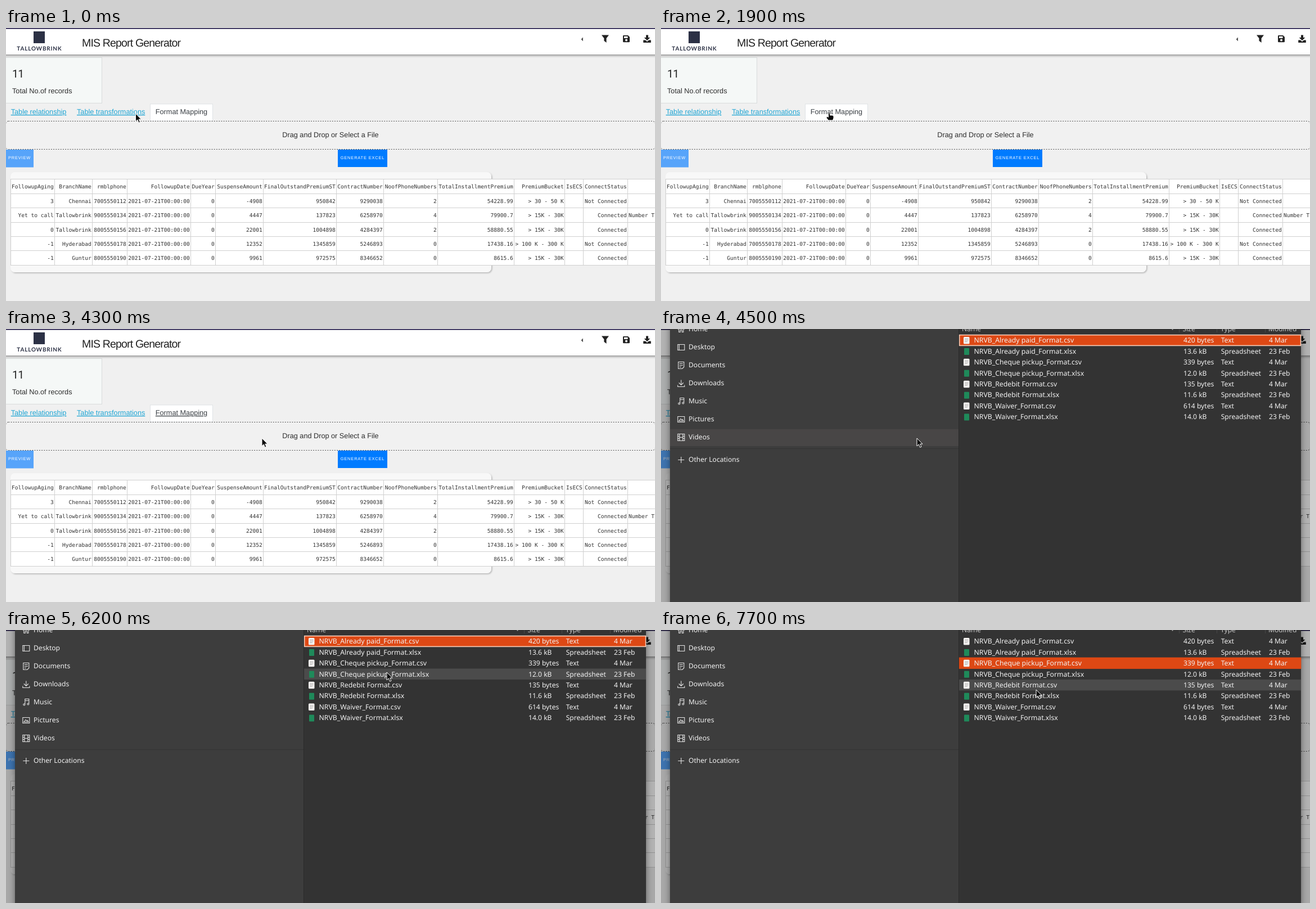
Animation, 1154 px wide and 485 px high, one loop 8000 ms. Source, as an HTML page:

```html
<!DOCTYPE html>
<html lang="en">
<head>
<meta charset="utf-8">
<title>MIS Report Generator</title>
<style>
html, body { margin: 0; width: 100%; height: 100%; overflow: hidden; background: #f0f0f0; }
svg { display: block; width: 1154px; height: 485px; }
text { font: 12.7px "Liberation Sans", Arial, sans-serif; fill: #2d2d2d; text-rendering: geometricPrecision; white-space: pre; }
.title { font-size: 19.5px; letter-spacing: -.83px; fill: #222; }
.count { font: 19.5px Roboto, sans-serif; letter-spacing: -.83px; fill: #222; }
.brand { font: 700 10px Lato, sans-serif; letter-spacing: .8px; fill: #2c3145; }
.button { font-size: 7.5px; letter-spacing: .8px; fill: #fff; }
.cell { font: 9.59px "DejaVu Sans Mono", monospace; fill: #333; }
.dialog text { font: 12.1px "Noto Sans", "Open Sans", sans-serif; fill: #f2f2f2; }
.dialog .head { fill: #c4c4c4; }
.line { fill: none; stroke: #e4e4e4; stroke-width: 1.1; }
.underlined { text-decoration: underline; text-decoration-thickness: 1px; text-underline-offset: 2px; }
</style>
</head>
<body>
<svg id="stage" viewBox="0 0 1154 485"></svg>
<script>
const LOOP = 8000, STEP = 100;
const LINK = '#1ea5d4', LINK_HOVER = '#0fa0ce', INK = '#3a3f44';
const ROW_TOP = 10.3, ROW_PITCH = 19.43;

const rect = (x, y, w, h, fill, more = '') =>
  `<rect x="${x}" y="${y}" width="${w}" height="${h}" fill="${fill}" ${more}/>`;
const text = (x, y, str, more = '') => `<text x="${x}" y="${y}" ${more}>${str.replace(/>/g, '&gt;')}</text>`;
const path = (d, more = '') => `<path d="${d}" ${more}/>`;

function header() {
  return rect(-4, 0, 1162, 47, '#fff', 'filter="url(#barShadow)"') +
    rect(0, 0, 1154, 1.6, '#1d1446') +
    rect(49, 6, 20, 21, '#2c3145') +
    text(59.4, 39.5, 'TALLOWBRINK', 'class="brand" text-anchor="middle"') +
    text(135, 33, 'MIS Report Generator', 'class="title"') +
    path('M1026 16.5V23.5L1022.5 20Z', 'fill="#555"') +
    path('M1059 12.5H1072L1067.6 18.3V26L1063.4 22.8V18.3Z', 'fill="#222"') +
    path('M1098.3 13H1106L1109 16V24Q1109 25.3 1107.7 25.3H1098.3Q1097 25.3 1097 24V14.3Q1097 13 1098.3 13ZM1099 14.8V18H1105.5V14.8ZM1103 19.6a2 2 0 1 0 .01 0Z',
      'fill="#222" fill-rule="evenodd"') +
    path('M1138 12.5H1142V17H1145.3L1140 22.3L1134.7 17H1138Z', 'fill="#222"') +
    path('M1133.2 21.5H1137L1140 24.3L1143 21.5H1146.8V26H1133.2Z', 'fill="#222"');
}

function summary() {
  return rect(-1, 52.5, 171.5, 81, '#f5f8f7', 'stroke="#d9dcdc"') +
    text(11, 87.5, '11', 'class="count"') +
    text(11, 116, 'Total No.of records');
}

function tabs() {
  const tab = (id, x, w) => rect(x, 135, w, 30, '#fff', `id="${id}" stroke="#e0e3e6"`);
  return tab('transformTab', 117, 139.5) + tab('formatTab', 256.5, 111) +
    text(8.7, 153, 'Table relationship', `class="underlined" style="fill:${LINK}"`) +
    text(126, 153, 'Table transformations', 'id="transformLabel"') +
    text(265.8, 153, 'Format Mapping', 'id="formatLabel"');
}

function table() {
  const edges = [8.5, 86.5, 153.5, 215.5, 328.5, 372.5, 457.5, 587.5, 671.5, 767.5, 903.5, 993.5, 1026.5, 1105.5, 1200];
  const date = '2021-07-21T00:00:00';
  const rows = [
    'FollowupAging|BranchName|rmblphone|FollowupDate|DueYear|SuspenseAmount|FinalOutstandPremiumST|ContractNumber|NoofPhoneNumbers|TotalInstallmentPremium|PremiumBucket|IsECS|ConnectStatus',
    `3|Chennai|7005550112|${date}|0|-4908|950842|9290038|2|54228.99|> 30 - 50 K||Not Connected`,
    `Yet to call|Tallowbrink|9005550134|${date}|0|4447|137823|6258970|4|79900.7|> 15K - 30K||Connected`,
    `0|Tallowbrink|8005550156|${date}|0|22001|1004898|4284397|2|58880.55|> 15K - 30K||Connected`,
    `-1|Hyderabad|7005550178|${date}|0|12352|1345859|5246893|0|17438.16|> 100 K - 300 K||Not Connected`,
    `-1|Guntur|8005550190|${date}|0|9961|972575|8346652|0|8615.6|> 15K - 30K||Connected`
  ];
  const lineY = i => Math.round(268.4 + 25.4 * i) + .5;
  const baseline = i => Math.round(285.3 + 25.42 * i);
  const grid = edges.map(x => `M${x} 268.5V421`).join('') +
    [...rows, ''].map((_, i) => `M8 ${lineY(i)}H1154`).join('');
  const cells = rows.map((row, r) => row.split('|').map((value, c) => value &&
    text(edges[c + 1] - 1.6, baseline(r), value, 'class="cell" text-anchor="end"')).join('')).join('');
  return rect(8, 256, 855, 178, '#f8f8f8', 'rx="8" filter="url(#cardShadow)"') +
    rect(8, 268.5, 1146, 152.5, '#fff') + path(grid, 'fill="none" stroke="#d0d0d0"') + cells +
    text(1107, baseline(2), 'Number To', 'class="cell"');
}

function content() {
  return `<g id="content">` +
    rect(-.5, 165.5, 1155, 50, '#f1f1f1', 'rx="5" stroke="#444" stroke-dasharray="1.8 2.4"') +
    text(577, 194, 'Drag and Drop or Select a File', 'text-anchor="middle"') +
    rect(0, 216, 49, 31.5, '#57a4fa') + text(4, 233.3, 'PREVIEW', 'class="button"') +
    rect(590, 216, 88, 31, '#007bff') + text(594.7, 233.3, 'GENERATE EXCEL', 'class="button"') +
    table() + '</g>';
}

function sidebar() {
  const places = [
    ['Home', 0, 'M-6 0L0 -6L6 0M-4 -1V5H-1.5V1H1.5V5H4V-1'],
    ['Desktop', 32, 'M-6 -5H6V5H-6ZM-3.5 -5V5'],
    ['Documents', 64, 'M-5 -6H5V3L2 6H-5ZM-3 -3H3M-3 0H3M-3 3H0'],
    ['Downloads', 96, 'M0 -6V3M-4 -1L0 3L4 -1M-6 3V6H6V3'],
    ['Music', 128, 'M-2 3V-6H5V2M-2 -3H5M-5 4a1.5 1.5 0 1 0 3 0a1.5 1.5 0 1 0 -3 0M2 3a1.5 1.5 0 1 0 3 0a1.5 1.5 0 1 0 -3 0'],
    ['Pictures', 160, 'M-6 -5H6V5H-6ZM-4 3L-1 -1L1 1L2.5 0L4 3Z'],
    ['Videos', 192, 'M-6 -6H6V6H-6ZM-3 -6V6M3 -6V6M-3 0H3M-6 -2H-3M-6 2H-3M3 -2H6M3 2H6'],
    ['Other Locations', 232, 'M-5.5 0H5.5M0 -5.5V5.5']
  ];
  return rect(16, -20, 513.5, 520, '#3d3d3d') +
    rect(16, 0, 513, 30, '#484646', 'id="placeHover"') +
    path('M16 212.5H529', 'stroke="#343434"') + path('M529.5 0V485', 'stroke="#2a2a2a"') +
    places.map(([name, y, icon]) =>
      path(icon, `class="line" transform="translate(35.8 ${y + .5})"`) + text(49, y + 4.3, name)).join('');
}

function files() {
  const sizes = ['420 bytes', '13.6 kB', '339 bytes', '12.0 kB', '135 bytes', '11.6 kB', '614 bytes', '14.0 kB'];
  const names = ['Already paid_Format', 'Cheque pickup_Format', 'Redebit Format', 'Waiver_Format'];
  const row = (size, i) => {
    const y = 20 + ROW_PITCH * i, sheet = i % 2;
    const icon = sheet ? rect(539, y - 5.5, 9, 12, '#1f8a5a', 'rx="1"')
      : rect(538, y - 6, 10.5, 12.5, '#f6f4f2', 'rx="1.5"') +
        path(`M540 ${y - 2.5}H546.5M540 ${y}H546.5M540 ${y + 2.5}H545`, 'stroke="#aaa"');
    return icon + text(556.5, y + 4.3, `NRVB_${names[i >> 1]}.${sheet ? 'xlsx' : 'csv'}`, 'style="font-size:12.25px"') +
      text(929, y + 4.3, size) + text(995.7, y + 4.3, sheet ? 'Spreadsheet' : 'Text') +
      text(1081, y + 4.3, sheet ? '23 Feb' : '4 Mar');
  };
  const heads = [[535, 'Name'], [927.5, 'Size'], [995, 'Type'], [1080, 'Modified']];
  return rect(530, -20, 608, 520, '#333') +
    heads.map(([x, name]) => text(x, 3.6, name, 'class="head"')).join('') +
    path('M906.5 -2H912.5L909.5 2Z', 'fill="#aaa"') +
    path('M921.5 0V6M988.5 0V6M1074.5 0V6', 'stroke="#474747"') +
    rect(530, 0, 608, ROW_PITCH, '#4b4b4b', 'id="fileHover"') +
    rect(530.7, 0, 606.8, ROW_PITCH - .6, '#dd4814', 'id="fileSelected" stroke-width="1.6"') +
    sizes.map(row).join('');
}

function pointers() {
  const style = 'fill="#0a0a0a" stroke="#fff" stroke-width="1" stroke-linejoin="round"';
  return path('M0 0V14L3.3 11L5.5 16.3L8 15.2L5.7 10.2H10Z', `id="arrow" ${style}`) +
    path('M-2.4 -.5Q-1 -2.6 .6 -.5V3H5Q7 3.4 7 5.5V8L5.6 12H-2.6L-5.8 7.6Q-6.2 5.4 -4.2 5.4L-2.4 6.4Z', `id="hand" ${style}`);
}

document.getElementById('stage').innerHTML = `
  <defs>
    <filter id="barShadow" y="-20%" height="150%"><feDropShadow dx="0" dy="2" stdDeviation="2.2" flood-opacity=".42"/></filter>
    <filter id="cardShadow"><feDropShadow dx="1.5" dy="1.5" stdDeviation="1" flood-opacity=".25"/></filter>
    <filter id="dialogShadow"><feDropShadow dx="0" dy="2" stdDeviation="6" flood-opacity=".45"/></filter>
  </defs>` +
  rect(0, 0, 1154, 485, '#f0f0f0') + summary() + header() + tabs() + content() +
  `<g id="dialog" class="dialog">${rect(0, 0, 1154, 485, '#000', 'opacity=".3"')}
    ${rect(16, -20, 1122, 520, '#333', 'filter="url(#dialogShadow)"')}${sidebar()}${files()}</g>` + pointers();

const part = Object.fromEntries([...document.querySelectorAll('[id]')].map(el => [el.id, el]));
const show = (el, on) => el.setAttribute('visibility', on ? 'visible' : 'hidden');

// Pointer track: time, x, y
const track = [
  [0, 230.5, 152], [1200, 230.5, 152], [1300, 246, 206], [1400, 280, 178], [1500, 300, 152],
  [2700, 300, 152], [3000, 336, 172], [3200, 369, 200], [3300, 369, 200], [3500, 455, 194],
  [4900, 455, 194], [5100, 505, 168], [5400, 630, 92], [5600, 684, 48], [5700, 689, 42],
  [5800, 686, 52], [6000, 680, 83], [6100, 680, 83], [6400, 671, 59],
  [7100, 671, 59], [7700, 667, 106], [LOOP, 667, 106]
];

function pointerAt(t) {
  const i = track.findIndex(([time]) => time > t);
  const [t0, x0, y0] = track[i - 1], [t1, x1, y1] = track[i];
  const k = (t - t0) / (t1 - t0);
  return [x0 + (x1 - x0) * k, y0 + (y1 - y0) * k];
}

function styleTab(name, active, hovered, underlined) {
  const label = part[name + 'Label'];
  show(part[name + 'Tab'], active);
  label.style.fill = active ? INK : hovered ? LINK_HOVER : LINK;
  label.classList.toggle('underlined', underlined);
}

function render(time) {
  const t = Math.floor(time / STEP) * STEP;
  const [x, y] = pointerAt(t);
  const open = t >= 4500;
  const transformActive = t >= 1000 && t < 1900;

  styleTab('transform', transformActive, t >= 200 && t < 1300, t < 200 || t >= 1700);
  styleTab('format', !transformActive, t >= 1500 && t < 3000, (t >= 700 && t < 1500) || t >= 4300);
  show(part.content, t < 1100 || t >= 1900);
  show(part.dialog, open);

  const place = Math.round(y / 32);
  show(part.placeHover, open && x < 529 && place <= 6);
  part.placeHover.setAttribute('y', place * 32 - 14);

  const row = Math.floor((y - ROW_TOP) / ROW_PITCH);
  show(part.fileHover, open && x >= 530 && row < 8);
  part.fileHover.setAttribute('y', ROW_TOP + row * ROW_PITCH);

  const picked = t >= 6700;
  part.fileSelected.setAttribute('y', ROW_TOP + .3 + (picked ? 2 * ROW_PITCH : 0));
  part.fileSelected.setAttribute('stroke', picked ? '#dd4814' : '#f6cdb9');

  const pointing = !open && t >= 200 && y < 165;
  show(part.hand, pointing);
  show(part.arrow, !pointing);
  for (const el of [part.hand, part.arrow]) el.setAttribute('transform', `translate(${x} ${y})`);
}

const start = performance.now();
function tick() {
  render((performance.now() - start) % LOOP);
  requestAnimationFrame(tick);
}
tick();
</script>
</body>
</html>
```
